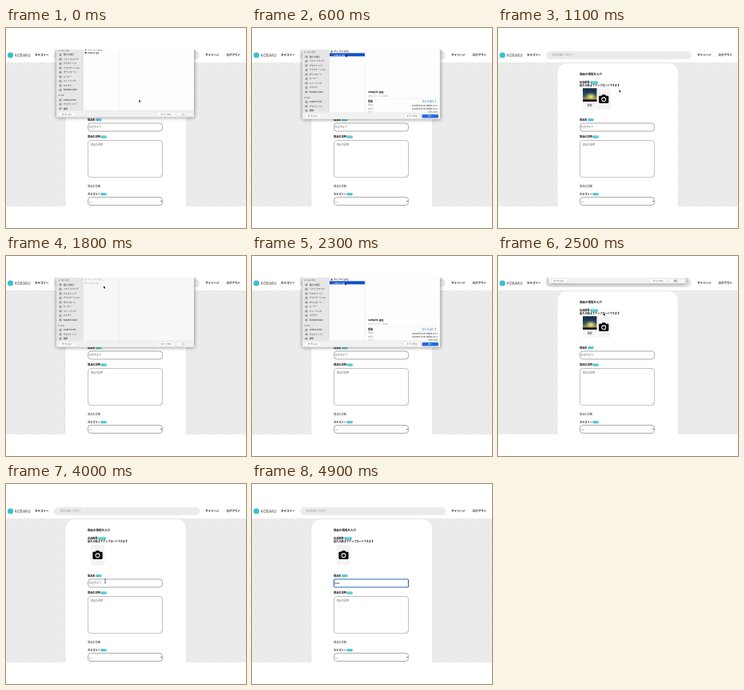
An HTML page that plays this animation: 300x250 px, repeating every 5 s.

```html
<!DOCTYPE html>
<html lang="ja">
<head>
<meta charset="utf-8">
<title>出品フォーム</title>
<style>
html, body { margin: 0; width: 100%; height: 100%; overflow: hidden; background: #fff; }
svg { display: block; width: 100vw; height: 100vh; }
text { font-family: "Noto Sans CJK JP", "Noto Sans CJK", "Noto Sans", sans-serif; white-space: pre; }
</style>
</head>
<body>
<svg id="stage" viewBox="0 0 300 250" xmlns="http://www.w3.org/2000/svg">
  <defs>
    <pattern id="weave" width="4" height="4" patternUnits="userSpaceOnUse">
      <rect width="4" height="4" fill="#ededed"/>
      <path d="M0 4L4 0M-1 1L1 -1M3 5L5 3" stroke="#e5e5e5" stroke-width=".8"/>
    </pattern>
    <linearGradient id="sky" x2="0" y2="1">
      <stop offset="0" stop-color="#10243c"/>
      <stop offset=".5" stop-color="#27506a"/>
      <stop offset=".8" stop-color="#8c8a4c"/>
      <stop offset="1" stop-color="#0c0f12"/>
    </linearGradient>
    <radialGradient id="glow">
      <stop offset="0" stop-color="#fff3a0"/>
      <stop offset=".4" stop-color="#dcc95c" stop-opacity=".8"/>
      <stop offset="1" stop-color="#c8b850" stop-opacity="0"/>
    </radialGradient>
    <clipPath id="view"><rect y="27" width="300" height="196"/></clipPath>
    <filter id="soft" x="-10%" y="-10%" width="120%" height="125%"><feGaussianBlur stdDeviation="2"/></filter>
  </defs>
  <g id="page" clip-path="url(#view)"></g>
  <g id="photos"></g>
  <g id="sheetClip" clip-path="url(#view)"><g id="sheet"></g></g>
  <g id="mouse">
    <path id="arrow" d="M0 0V3.3L.8 2.6L1.3 3.8L1.8 3.5L1.3 2.4H2.3Z" fill="#111"/>
    <path id="beam" d="M-1 -2.4Q0 -2.4 0 -1.8Q0 -2.4 1 -2.4M0 -1.8V1.8M-1 2.4Q0 2.4 0 1.8Q0 2.4 1 2.4" fill="none" stroke="#222" stroke-width=".6"/>
  </g>
</svg>
<script>
const LOOP = 5000, STEP = 100;
const $ = id => document.getElementById(id);

const rect = (x, y, w, h, fill, r = 0, extra = '') =>
  `<rect x="${x}" y="${y}" width="${w}" height="${h}" rx="${r}" fill="${fill}" ${extra}/>`;
// y is the middle of the line
const text = (x, y, s, size, fill = '#222', extra = '') =>
  `<text x="${x}" y="${y + size * 0.37}" font-size="${size}" fill="${fill}" ${extra}>${s}</text>`;
const BOLD = 'font-weight="700"', MEDIUM = 'font-weight="500"';
const MID = 'text-anchor="middle"', END = 'text-anchor="end"';
const line = (d, stroke, w = 0.4) => `<path d="${d}" fill="none" stroke="${stroke}" stroke-width="${w}"/>`;
const box = (y, h, stroke) => rect(102.5, y, 93, h, '#fff', 3.5, `stroke="${stroke}" stroke-width=".7"`);

const badge = (x, y, w) => rect(x, y - 1.6, w, 3.4, '#35b9c6', 1) +
  text(x + w / 2, y + 0.1, '必須', 2.4, '#fff', MID);
const label = (y, s) => text(102, y, s, 3.2, '#111', BOLD);

function buildPage() {
  $('page').innerHTML =
    rect(0, 43, 300, 180, 'url(#weave)') +
    rect(74, 43.6, 151.4, 200, '#fff', 12, 'stroke="#d8d8d8" stroke-width=".5"') +
    rect(0, 20, 300, 23, '#fff') +
    '<circle cx="5.5" cy="34" r="3.6" fill="#3bc0cf"/>' +
    text(11, 34.1, 'KOBARU', 4.5, '#333', MEDIUM + ' letter-spacing=".35"') +
    text(36, 34, 'カテゴリー', 3.5, '#111', BOLD) +
    rect(60, 29, 182, 10, '#ebebeb', 5) +
    text(68, 34, '何かお探しですか？', 2.9, '#858585') +
    text(249, 34, 'マイページ', 3.5, '#111', BOLD) +
    text(275.5, 34, 'ログアウト', 3.5, '#111', BOLD) +
    text(102, 58.2, '商品の情報を入力', 3.5, '#111', BOLD) +
    label(68, '出品画像') + badge(115.6, 68, 9) +
    text(102, 72.2, '最大10枚までアップロードできます', 3.1, '#111', BOLD) +
    label(114.5, '商品名') + badge(112.4, 114.5, 7) +
    '<rect id="field" x="102.5" y="119" width="93" height="10" fill="#fff"/>' +
    '<g id="entry"></g>' +
    label(136, '商品の説明') + badge(118.6, 136, 7) +
    box(140.5, 46.2, '#a8a8a8') +
    text(106, 146, '商品の説明', 3, '#666') +
    line('M192.5 185.5L194.8 183.2M194 185.6L194.9 184.7', '#888', 0.3) +
    text(102, 197.8, '商品の詳細', 3.2, '#333') +
    label(207.5, 'カテゴリー') + badge(118.6, 207.5, 7) +
    box(211.5, 10, '#888') +
    text(104, 216.5, '---', 3.2, '#111', BOLD) +
    line('M193 216L194 217L195 216', '#222', 0.6);
}

const photo = x => rect(x, 75, 17.6, 26.5, '#f6f6f6') +
  rect(x, 75.3, 17.6, 16.7, 'url(#sky)') +
  `<ellipse cx="${x + 10}" cy="86" rx="7.4" ry="5.5" fill="url(#glow)"/>` +
  rect(x, 89.5, 17.6, 2.5, '#0c1013') +
  text(x + 8.8, 97, '削除', 3.1, '#222', MID);

const camera = x => rect(x, 76, 17, 25.4, '#f3f3f3') +
  `<g transform="translate(${x + 8.5} 88.6)">
    <path d="M-5 -3.8H-2.9L-1.8 -5.4H1.8L2.9 -3.8H5Q6.1 -3.8 6.1 -2.7V4.2Q6.1 5.3 5 5.3H-5Q-6.1 5.3 -6.1 4.2V-2.7Q-6.1 -3.8 -5 -3.8Z" fill="#050505"/>
    <circle cy=".7" r="3" fill="#f3f3f3"/><circle cy=".7" r="1.9" fill="#050505"/></g>`;

const PLACES = ['最近の項目', 'ノルベ ドライブ', 'デスクトップ', 'アプリケーション', 'ダウンロード',
  'ムービー', 'ミュージック', 'ピクチャ', 'hanamorisato'];
const CLOUD = ['Sorami Drive', 'デスクトップ', '書類'];

const place = (s, y) => rect(66.8, y - 1.1, 2.4, 2.2, '#bbb', 0.5, 'stroke="#555" stroke-width=".4"') +
  text(71.7, y, s, 2.65, '#222', MEDIUM);
const button = (x, w, s, fill, ink) => rect(x, 108, w, 4.6, fill, 1, 'stroke="#cfcfcf" stroke-width=".25"') +
  text(x + w / 2, 110.2, s, 2.7, ink, MID);

function details() {
  const day = '2020年9月24日 木曜日 22:17';
  const rows = [['作成日', day], ['変更日', day], ['大きさ', '1280×853']];
  return line('M145 88H232', '#e2e2e2', 0.3) +
    text(145, 80, 'sample.jpg', 3.5, '#111', BOLD) +
    text(145, 84.6, 'JPEGイメージ - 38 KB', 2.5, '#888') +
    text(145, 91.6, '情報', 2.9, '#111', BOLD) +
    text(231, 91.6, '表示を減らす', 3.1, '#2f79d8', END) +
    rows.map(([name, value], i) => text(145, 96.6 + i * 4.2, name, 2.3, '#888') +
      text(232, 96.6 + i * 4.2, value, 2.5, '#222', END + ' ' + MEDIUM)).join('');
}

function drawSheet(picked, loading, closing) {
  const ink = loading ? '#b8b8b8' : '#222';
  const mark = loading ? '#ccc' : '#555';
  const active = picked && !closing;
  return rect(62.5, 12, 173.5, 103, '#000', 2, 'opacity=".36" filter="url(#soft)"') +
    rect(63.2, 10, 171.8, 103.8, loading ? '#f7f7f7' : '#fdfdfd', 1.5, 'stroke="#c4c4c4" stroke-width=".3"') +
    rect(63.2, 10, 33.8, 95.8, '#e6e6e6') +
    line('M141 10V105.8', '#d8d8d8') +
    text(65, 30.3, 'よく使う項目', 2.4, '#666') +
    PLACES.map((s, i) => place(s, 36 + i * 5.5)).join('') +
    text(65, 87, 'Sorami', 2.4, '#666') +
    CLOUD.map((s, i) => place(s, 92.5 + i * 5.4)).join('') +
    (picked ? details() + rect(97, 31.4, 44, 4, '#0f4fcb') : '') +
    rect(98.6, 28.4, 2, 2, mark) +
    text(102, 29.4, 'IMG_0003.jpeg', 2.7, ink, MEDIUM) +
    rect(98.6, 32.5, 2, 2, mark) +
    text(102, 33.6, 'sample.jpg', 2.7, picked ? '#fff' : ink, MEDIUM) +
    rect(63.2, 105.8, 171.8, 8, '#f1f1f1', 1) + line('M63.2 105.8H235', '#d8d8d8', 0.3) +
    button(66, 20.5, 'オプション', '#fff', '#222') +
    button(190, 20.5, 'キャンセル', '#fff', '#222') +
    button(212.5, 20.5, '開く', active ? '#1f69e0' : '#f6f6f6', active ? '#fff' : closing ? '#222' : '#aaa');
}

// Keys are [time, ...values]
function along(keys, t) {
  let i = 0;
  while (i < keys.length - 2 && t >= keys[i + 1][0]) i++;
  const a = keys[i], b = keys[i + 1];
  const k = Math.max(0, Math.min(1, (t - a[0]) / (b[0] - a[0])));
  const e = k * k * (3 - 2 * k);
  return a.slice(1).map((v, n) => v + (b[n + 1] - v) * e);
}

const SLIDE = [[0, -2.5], [100, 0], [700, 0], [900, -79], [1000, -100],
  [1300, -100], [1600, 0], [2300, 0], [2500, -79.5], [2600, -100]];
const MOUSE = [[0, 166.3, 89.5], [400, 117, 33], [700, 117, 33], [1100, 151.5, 77], [1300, 132, 88],
  [1500, 132, 88], [1800, 122, 37.3], [2000, 116, 33], [2300, 116, 33], [2500, 132, 71.5],
  [3000, 115, 96.5], [3500, 115, 96.5], [4000, 124, 121.5]];

const within = (t, a, b) => t >= a && t < b;

function photoCount(t) {
  if (t < 1000) return 0;
  if (t < 2700) return 1;
  if (t < 3100) return 2;
  return t < 3400 ? 1 : 0;
}

function render(t) {
  const n = photoCount(t);
  $('photos').innerHTML = Array.from({ length: n }, (_, i) => photo(106 + i * 17.7)).join('') + camera(106 + n * 17.7);

  const [dy] = along(SLIDE, t);
  const picked = within(t, 500, 1000) || within(t, 2000, 2600);
  const closing = within(t, 700, 1000) || within(t, 2400, 2600);
  $('sheetClip').style.display = dy > -95 ? '' : 'none';
  $('sheet').innerHTML = drawSheet(picked, within(t, 1300, 1900), closing);
  $('sheet').setAttribute('transform', `translate(0 ${dy})`);

  const focus = t >= 4200;
  $('field').setAttribute('stroke', focus ? '#2f6db5' : '#888');
  $('field').setAttribute('stroke-width', focus ? 1.2 : 0.7);
  $('field').setAttribute('rx', focus ? 1.2 : 3.5);
  const typed = 'a'.repeat([4500, 4600, 4800].filter(k => t >= k).length);
  $('entry').innerHTML = typed
    ? text(103.6, 124, typed, 3.4, '#111', MEDIUM)
    : text(103.6, 124, '40文字まで', 3, '#666');

  const [x, y] = along(MOUSE, t);
  const beam = t >= 3900;
  $('mouse').setAttribute('transform', `translate(${x} ${y})`);
  $('mouse').style.display = t < 4500 ? '' : 'none';
  $('arrow').style.display = beam ? 'none' : '';
  $('beam').style.display = beam ? '' : 'none';
}

buildPage();
const start = performance.now();
function tick() {
  const t = (performance.now() - start) % LOOP;
  render(Math.floor(t / STEP) * STEP);
  requestAnimationFrame(tick);
}
tick();
</script>
</body>
</html>
```
